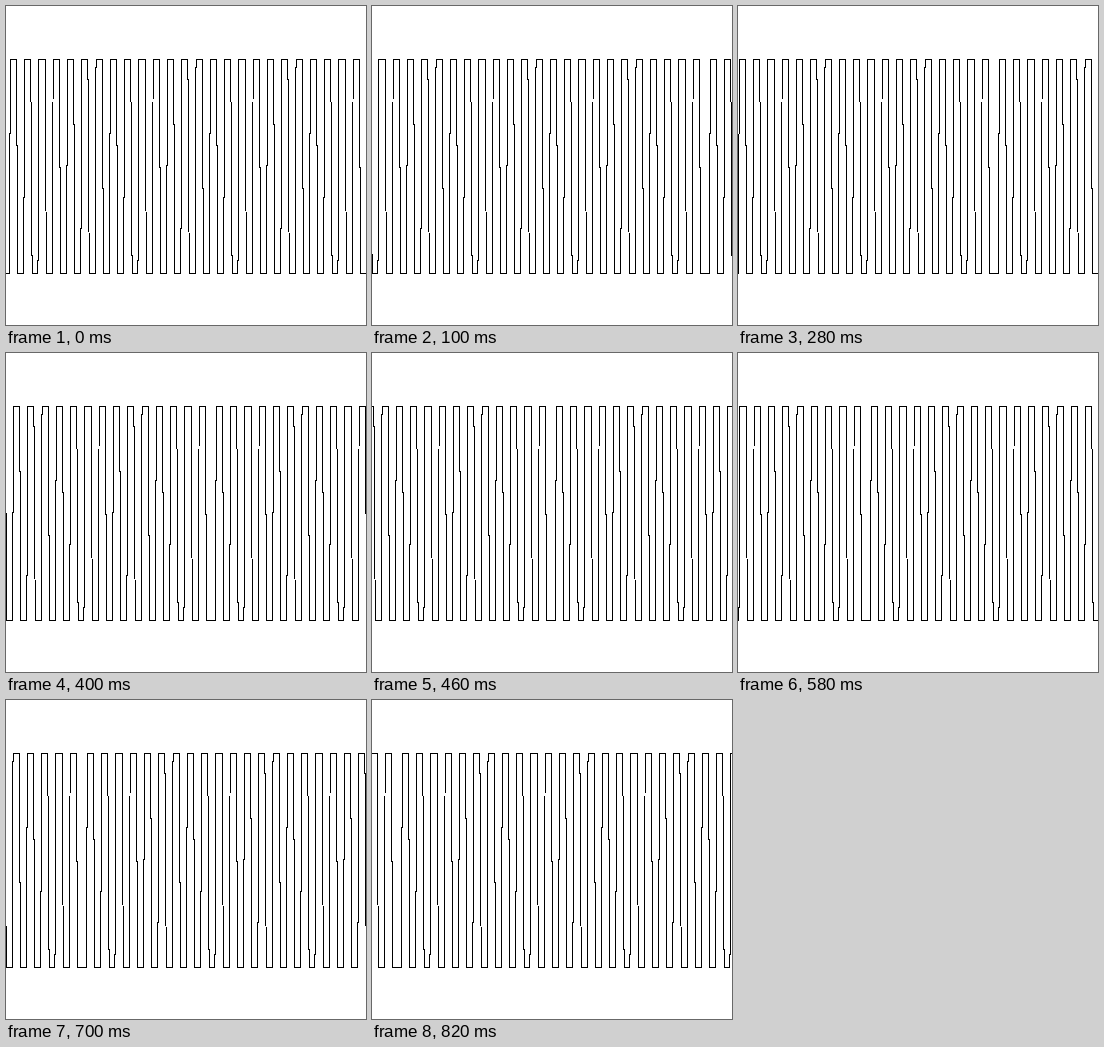
Write an HTML page that moves like this. It is 360 px wide and 319 px high and loops after 0.88 s.

```html
<!DOCTYPE html>
<html lang="en">
<head>
<meta charset="utf-8">
<title>Square wave</title>
<style>
  html, body { margin: 0; width: 100%; height: 100%; overflow: hidden; background: #fff; }
  svg { display: block; width: 360px; height: 319px; }
</style>
</head>
<body>
<svg viewBox="0 0 360 319" shape-rendering="crispEdges">
  <path id="wave" fill="none" stroke="#000" stroke-width="1"/>
</svg>
<script>
const WIDTH = 360, TOP = 53.5, BOTTOM = 267.5;
const STEPS = 14, LOOP = 880, HOLD = 100, STEP = 60;
const CYCLES = 25, PERIOD = 100 / 7;
const RISE = { mid: 3.87, width: 0.95 };
const FALL = { mid: 11.15, width: 1.4 };
const wave = document.getElementById('wave');

// A steep edge, leaning over its width.
function edge({ mid, width }, left, from, to) {
  const x = left + mid;
  return `L${(x - width / 2).toFixed(3)} ${from}L${(x + width / 2).toFixed(3)} ${to}`;
}

// All cycles across one stage width.
function strip(left) {
  let path = '';
  for (let i = 0; i < CYCLES; i++) {
    const x = left + i * PERIOD;
    path += edge(RISE, x, BOTTOM, TOP) + edge(FALL, x, TOP, BOTTOM);
  }
  return path;
}

// Two strips in a row let the wave wrap around the stage.
wave.setAttribute('d',
  `M-2 ${BOTTOM}${strip(0)}${strip(WIDTH)}L${2 * WIDTH + 2} ${BOTTOM}`);

function draw(time) {
  const t = time % LOOP;
  const step = t < HOLD ? 0 : Math.min(STEPS - 1, 1 + Math.floor((t - HOLD) / STEP));
  wave.setAttribute('transform', `translate(${-Math.round(step * WIDTH / STEPS)} 0)`);
}

function tick() {
  draw(performance.now());
  requestAnimationFrame(tick);
}

draw(0);
requestAnimationFrame(tick);
</script>
</body>
</html>
```
